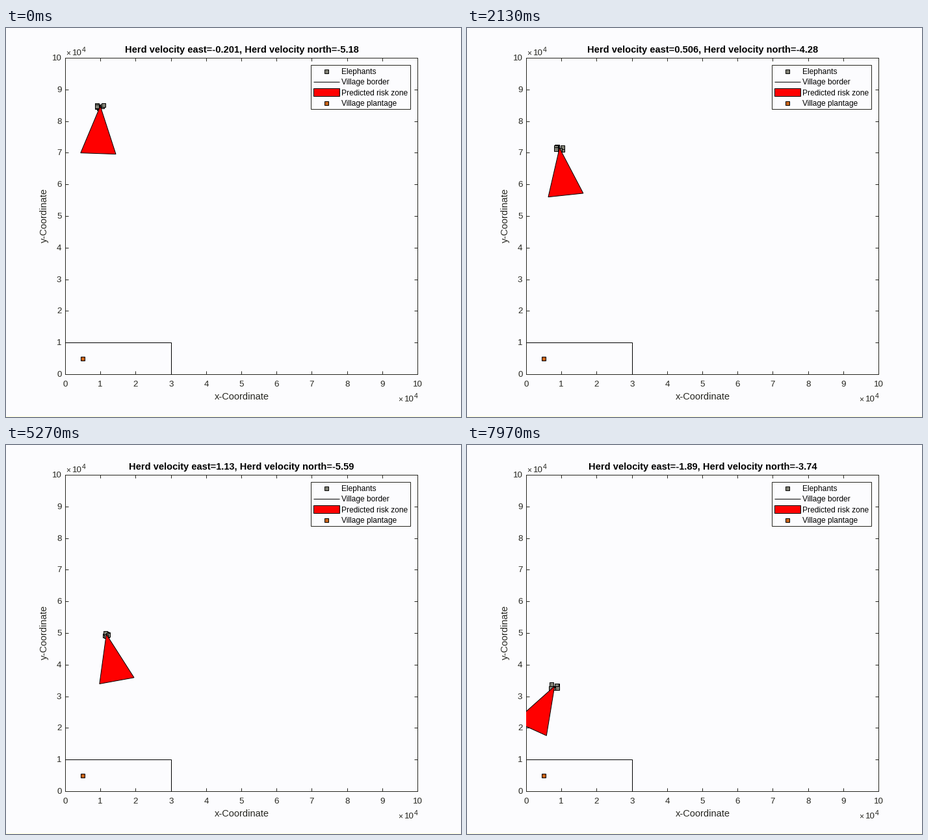
These frames come from a looping animation (700x600 px, 8000 ms). A matplotlib script:

```python
import math

import matplotlib.pyplot as plt
import numpy as np
from matplotlib.animation import FuncAnimation
from matplotlib.patches import Polygon, Rectangle

W, H, DPI = 700, 600, 100
PT = 72 / DPI  # points per pixel
FRAMES, LOOP_MS = 240, 8000
LEFT, RIGHT, TOP, BOTTOM = 91, 633, 45, 533
BG, INK, BLACK = "#fcfcfe", "#262620", "#000000"
GREY, ORANGE, RED = "#808074", "#c86419", "#ff0000"
STEP = 0.005  # axis units travelled per frame at unit velocity
REACH, HALF = 1.5, 0.5  # risk zone length and half width
HERD = 8

plt.rcParams["font.family"] = "Liberation Sans"
fig = plt.figure(figsize=(W / DPI, H / DPI), dpi=DPI, facecolor=BG)
ax = fig.add_axes([0, 0, 1, 1])
# Whole coordinates name pixels: strokes at them snap to that row or column
ax.set_xlim(-0.4, W - 0.4)
ax.set_ylim(H - 0.6, -0.6)
ax.axis("off")


def to_px(x, y):
    return LEFT + x * (RIGHT - LEFT) / 10, BOTTOM - y * (BOTTOM - TOP) / 10


def line(xs, ys, color=INK, z=1):
    ax.plot(xs, ys, color=color, lw=PT, zorder=z, solid_capstyle="butt",
            solid_joinstyle="miter")


def label(x, y, s, size=13.333, ha="left", color=INK, **kw):
    return ax.text(x - 0.4, y - 0.6, s, fontsize=size * PT, ha=ha,
                   va="baseline", color=color, zorder=8, **kw)


def box(x, y, w, h, fill, edge=BLACK, z=7):
    return ax.add_patch(Rectangle((x, y), w, h, fc=fill, ec=edge, lw=PT,
                                  zorder=z))


def square(x, y, fill, z=7):
    return box(round(x) - 3, round(y) - 3, 6, 6, fill, z=z)


def power(x, y):
    label(x + 0.5, y, "×", 12)
    label(x + 10, y, "10")
    label(x + 25, y - 5, "4", 10.667)


def draw_axes():
    line([LEFT, RIGHT, RIGHT, LEFT, LEFT], [TOP, TOP, BOTTOM, BOTTOM, TOP])
    for i in range(11):
        x, y = (round(c) for c in to_px(i, i))
        line([x, x], [BOTTOM, BOTTOM - 5])
        line([x, x], [TOP, TOP + 5])
        line([LEFT, LEFT + 5], [y, y])
        line([RIGHT, RIGHT - 5], [y, y])
        label(x, 553, str(i), ha="center")
        label(85.5, y + 5, str(i), ha="right")
    power(92, 42)
    power(603, 576)
    label(363, 573, "x-Coordinate", 14.667, "center")
    label(63, 289, "y-Coordinate", 14.667, "center", rotation=90,
          rotation_mode="anchor")


def draw_legend():
    box(469, 56, 153, 68, BG, INK, 6)
    square(493, 66, GREY)
    line([473, 513], [82, 82], BLACK, 7)
    box(473, 92, 40, 12, RED)
    square(493, 115, ORANGE)
    names = ["Elephants", "Village border", "Predicted risk zone",
             "Village plantage"]
    for i, name in enumerate(names):
        label(516, round(71 + 16.4 * i), name, 12, color=BLACK)


ax.add_patch(Rectangle((-1, 598), W + 2, 3, fc="#ffffd8", lw=0))
draw_axes()
draw_legend()
vx, vy = (round(c) for c in to_px(3, 1))
line([LEFT, vx, vx], [vy, vy, BOTTOM], BLACK, 3)
square(*to_px(0.5, 0.5), ORANGE, 5)

# Way points of the herd: frame, x, y, velocity east, velocity north
WAY = np.array([
    (0, 0.990, 8.466, -0.201, -5.18),
    (37, 0.903, 7.637, -0.025, -3.13),
    (90, 1.014, 6.561, 0.494, -4.09),
    (125, 0.938, 5.838, -0.166, -4.82),
    (158, 1.161, 4.954, 1.13, -5.59),
    (188, 1.089, 4.391, -0.403, -3.62),
    (239, 0.800, 3.312, -1.89, -3.74),
])
rng = np.random.default_rng(5)
PACE = rng.uniform(0.05, 0.14, (HERD, 2))
PHASE = rng.uniform(0, 2 * math.pi, (HERD, 2))


def herd(f):
    """Centre and velocity at frame f, a cubic through the way points."""
    i = min(int(np.searchsorted(WAY[:, 0], f, "right")) - 1, len(WAY) - 2)
    a, b = WAY[i], WAY[i + 1]
    n = b[0] - a[0]
    s = (f - a[0]) / n
    va, vb = a[3:], b[3:]
    bulge = (b[1:3] - a[1:3]) / (n * STEP) - (va + vb) / 2
    vel = va + (vb - va) * s + 6 * bulge * s * (1 - s)
    gone = va * s + (vb - va) * s * s / 2 + bulge * (3 * s**2 - 2 * s**3)
    return a[1:3] + gone * n * STEP, vel


animals = [square(0, 0, GREY, 2) for _ in range(HERD)]
zone = Polygon([(0, 0)] * 3, closed=True, fc=RED, ec=BLACK, lw=PT, zorder=4,
               joinstyle="miter")
ax.add_patch(zone)
zone.set_clip_path(Rectangle((LEFT, TOP), RIGHT - LEFT, BOTTOM - TOP,
                             transform=ax.transData))
title = label(362.5, 38, "", 14.667, "center", BLACK, weight="bold")


def update(f):
    pos, vel = herd(f)
    ahead = vel / np.hypot(*vel)
    side = np.array([-ahead[1], ahead[0]]) * HALF
    base = pos + ahead * REACH
    zone.set_xy([to_px(*p) for p in (pos, base + side, base - side)])
    roam = np.sin(PACE * f + PHASE) * (5, 3)
    for animal, spot in zip(animals, to_px(*pos) + roam):
        animal.set_xy(np.round(spot) - 3)
    title.set_text(f"Herd velocity east={vel[0]:.3g}, "
                   f"Herd velocity north={vel[1]:.3g}")
    return *animals, zone, title


anim = FuncAnimation(fig, update, frames=FRAMES, interval=LOOP_MS / FRAMES,
                     repeat=True, repeat_delay=0, blit=False)
plt.show()
```
